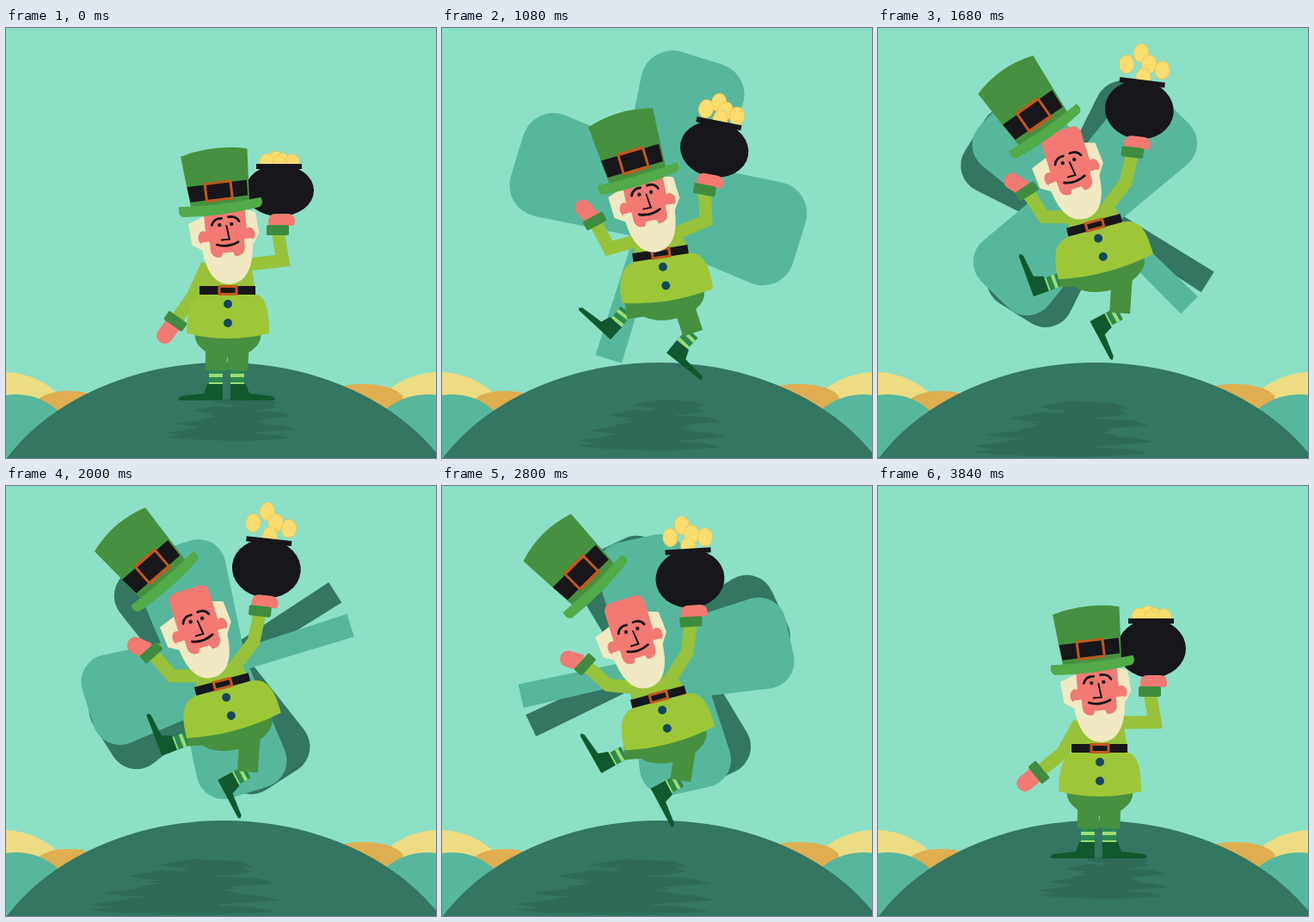
Recreate the animation shown at these times as an HTML page with a canvas. Size 500 by 500 pixels, loop 4 s.

```html
<!DOCTYPE html>
<html lang="en">
<head>
<meta charset="utf-8">
<title>Leprechaun jump</title>
<style>
  html, body { margin: 0; width: 100%; height: 100%; overflow: hidden; background: #8ce0c6; }
  canvas { display: block; width: 100vw; height: 100vh; }
</style>
</head>
<body>
<canvas id="stage" width="500" height="500"></canvas>
<script>
const ctx = document.getElementById('stage').getContext('2d');
const LOOP = 4000, RAD = Math.PI / 180;
const C = {
  sky: '#8ce0c6', hill: '#337662', teal: '#57b79c', shadow: '#2d6a57', sand: '#deae50', straw: '#ecdc84',
  gold: '#fbdc6e', crown: '#46913f', brim: '#52aa48', black: '#17161a', buckle: '#c0591c', skin: '#f27a72',
  hair: '#f0e9c2', lime: '#9dc638', sleeve: '#98c23a', cuff: '#3f8c40', shoe: '#10592f', button: '#15475f'
};

// torso: x, y, angle, belly half width, shoulder height; other parts: x, y, angle
const STAND = { torso: [258, 305, 0, 48, -30], pot: [318, 189, 0], hand: [197, 341], footL: [244, 414, 0], footR: [269, 414, 0] };
const CROUCH = { torso: [258, 310, 0, 49, -28], pot: [335, 208, 17], hand: [171, 285], footL: [213, 408, 3], footR: [297, 410, 5] };
const FLOAT = { torso: [252, 229, -15, 57, -14], pot: [304, 95, 7], hand: [182, 183], footL: [196, 298, 70], footR: [267, 339, 62] };

const clamp = v => Math.min(1, Math.max(0, v));
const mix = (a, b, k) => a + (b - a) * k;
const add = (part, ...by) => by.forEach((v, i) => part[i] += v);

function ramp(t, from, to) {
  const u = clamp((t - from) / (to - from));
  return u * u * (3 - 2 * u);
}

function poseAt(t) {
  const crouch = ramp(t, 240, 680) - ramp(t, 3540, 3840);
  const air = ramp(t, 800, 1300) - ramp(t, 3210, 3540);
  const loose = ramp(t, 800, 1300);
  const slip = air * Math.min(1.2, Math.max(0, (t - 1400) / 1800)) ** 3;
  const toss = air * Math.sin(Math.PI * clamp((t - 1400) / 2400)) ** .6;
  const p = { crouch, air, slip, toss };
  for (const part in STAND) {
    p[part] = STAND[part].map((v, i) => mix(mix(v, CROUCH[part][i], crouch), FLOAT[part][i], air));
  }
  add(p.torso, 0, 7 * slip, 0, -6 * slip);
  add(p.pot, -33 * slip, 0, -22 * slip);
  add(p.footL, 4 * slip, 15 * slip, -20 * slip);
  add(p.footR, -8 * slip, -4 * slip);
  const settle = loose * (1 - air) * (1 - crouch);
  add(p.hand, -16 * toss - 10 * settle, 12 * toss - 8 * settle);
  p.potHeight = 30 + 4 * loose;
  p.coinLift = clamp(air * (1 - .6 * slip * slip));

  const tilt = p.torso[2] - 5 * (1 - air) - 2 * air;
  const neck = toStage(p.torso, -2 - 8 * air, -68 + 16 * crouch * (1 - air) - 3 * air - 7 * slip);
  p.head = [...neck, tilt];
  p.hat = [...toStage(p.head, -4, -30 + 4 * air), tilt - 2 - 4 * air];
  add(p.hat, -34 * toss, -36 * toss, -22 * toss);
  return p;
}

function toStage([x, y, deg], px, py) {
  const c = Math.cos(deg * RAD), s = Math.sin(deg * RAD);
  return [x + px * c - py * s, y + px * s + py * c];
}

// Middle joint of a two-bone limb
function joint([ax, ay], [bx, by], bend, upper = 40, lower = 36) {
  const d = Math.min(Math.hypot(bx - ax, by - ay), upper + lower);
  const turn = Math.acos((upper ** 2 + d ** 2 - lower ** 2) / (2 * upper * d));
  const a = Math.atan2(by - ay, bx - ax) + bend * turn;
  return [ax + upper * Math.cos(a), ay + upper * Math.sin(a)];
}

function place(x, y, deg, draw) {
  ctx.save();
  ctx.translate(x, y);
  ctx.rotate(deg * RAD);
  draw();
  ctx.restore();
}

function fill(color, path) {
  ctx.beginPath();
  path();
  ctx.fillStyle = color;
  ctx.fill();
}

const poly = (color, ...pts) => fill(color, () => pts.forEach(p => ctx.lineTo(...p)));
const oval = (color, x, y, rx, ry) => fill(color, () => ctx.ellipse(x, y, rx, ry, 0, 0, 7));
const box = (color, x, y, w, h, r = 0) => fill(color, () => ctx.roundRect(x, y, w, h, r));

function line(color, width, pts, dash = []) {
  ctx.beginPath();
  pts.forEach(p => ctx.lineTo(...p));
  ctx.strokeStyle = color;
  ctx.lineWidth = width;
  ctx.setLineDash(dash);
  ctx.stroke();
  ctx.setLineDash([]);
}

function frame(x, y, w, h) {
  ctx.strokeStyle = C.buckle;
  ctx.lineWidth = 3;
  ctx.strokeRect(x, y, w, h);
}

function drawHills() {
  for (const x of [-5, 505]) oval(C.straw, x, 470, 85, 70);
  oval(C.sand, 73, 440, 40, 18);
  oval(C.sand, 415, 432, 47, 18);
  oval(C.teal, 12, 506, 75, 80);
  oval(C.teal, 490, 506, 78, 80);
  oval(C.hill, 253, 611, 291, 222);
}

// Overshooting growth from 0 to 1
function back(u, amount) {
  const w = 1 - clamp(u);
  return 1 + amount * w ** 2 - (amount + 1) * w ** 3;
}

const cloverAngle = t => -176 - 195 * Math.sin((t - 2308) * .00117);

function drawClover(t) {
  for (const [color, lag] of [[C.hill, 70], [C.teal, 0]]) {
    const scale = t < 2400 ? back((t - 920 - lag) / 640, 4) : back((3560 - t) / 420, 1.7);
    if (scale <= 0) continue;
    place(248, 210, cloverAngle(t + lag), () => {
      ctx.scale(scale, scale);
      ctx.translate(0, -10);
      poly(color, [-12, 0], [12, 0], [14, 170], [-14, 170]);
      for (const side of [-90, 0, 90]) place(0, 0, side, () => fill(color, () => {
        ctx.moveTo(-42, 0);
        ctx.arcTo(-57, -150, 0, -150, 32);
        ctx.arcTo(57, -150, 42, 0, 32);
        ctx.lineTo(42, 0);
      }));
    });
  }
}

// Ragged stack of pointed streaks
function drawShadow({ air, toss }) {
  const left = mix(175, 125, air) - 58 * toss, right = 357 - 9 * air;
  const top = 432 + 5 * air, bottom = mix(478, 496, air), rows = 9;
  for (let i = 0; i < rows; i++) {
    const v = (i + .5) / rows, wobble = Math.sin(i * 2.4);
    const x = mix(left, right, .58 - .16 * v + .1 * wobble), y = mix(top, bottom, v);
    const half = (right - left) * (.14 + .24 * v + .05 * Math.cos(i * 4));
    const thick = (bottom - top) / rows;
    poly(C.shadow, [x - half, y], [x - half * .3, y - thick], [x + half * .7, y - thick * .6],
      [x + half, y + thick * .3], [x + half * .2, y + thick], [x - half * .7, y + thick * .5]);
  }
}

function drawLeg(hip, foot, width, flip, crouch) {
  const ankle = toStage(foot, -4 * crouch * flip, -16 - 5 * crouch);
  const top = foot.slice(0, 2);
  line('#2b8a4e', 16, [ankle, top]);
  line('#9bdc74', 16, [ankle, top], [0, 4, 4, 2]);
  line(C.crown, width, [hip, ankle]);
  place(...foot, () => {
    ctx.scale(flip, 1);
    poly(C.shoe, [8, 0], [-10, 0], [-14, 11], [-41, 14], [-44, 17], [-42, 19], [8, 19]);
  });
}

function drawLegs({ torso, footL, footR, air, crouch }) {
  const flex = crouch * (1 - air);
  drawLeg(toStage(torso, -13, 60), footL, 25 - 8 * air, 1, flex);
  drawLeg(toStage(torso, 13 + 5 * air, 58), footR, 24, -1, flex);
  place(...torso.slice(0, 3), () => oval(C.crown, 0, 52, torso[3] * .8, 26));
}

function drawArms({ torso, pot, hand, air, potHeight }) {
  const top = torso[4], reach = 9 - top / 2;
  const right = toStage(torso, reach, top), left = toStage(torso, -reach, top);
  const wrist = toStage(pot, -2, potHeight + 16), elbow = joint(left, hand, -1);
  line(C.sleeve, 15, [right, joint(right, wrist, 1), wrist]);
  line(C.sleeve, 15, [left, elbow, hand]);
  place(...hand, Math.atan2(hand[1] - elbow[1], hand[0] - elbow[0]) / RAD - 90, () => {
    place(0, 0, -25 * air, () => box(C.skin, -10, 4, 19, 26, [0, 0, 9, 9]));
    box(C.cuff, -13, -6, 26, 12, 2);
  });
}

function drawTorso({ torso: [x, y, deg, w, top] }) {
  place(x, y, deg, () => {
    poly(C.sleeve, [-33, 6], [-26, top - 7], [26, top - 7], [33, 6]);
    fill(C.lime, () => {
      ctx.moveTo(-w, 50);
      ctx.bezierCurveTo(-w, 20, 8 - w, 5, -29, 5);
      ctx.lineTo(31, 5);
      ctx.bezierCurveTo(w - 5, 5, w, 22, w, 50);
      ctx.quadraticCurveTo(0, 62, -w, 50);
    });
    box(C.black, -33, -5, 65, 10);
    frame(-10, -4.5, 20, 9);
    for (const y of [16, 38]) oval(C.button, 0, y, 5, 5);
  });
}

function drawPot({ pot, potHeight: ry, coinLift }) {
  place(...pot, () => {
    for (const [x, y] of [[-6, -66], [5, -54], [-21, -51], [21, -49], [0, -38]]) {
      const cx = x * mix(.7, 1, coinLift), cy = mix(-ry - 2 + (y + 50) * .2, y, coinLift);
      oval('#edc458', cx, cy, 9, 11);
      oval(C.gold, cx, cy, 8.3, 10.3);
    }
    oval(C.black, 0, 0, 40, ry);
    box(C.black, -27, -ry - 1, 53, 6);
    box(C.skin, -13, ry - 3, 31, 14, [8, 8, 4, 2]);
    box(C.cuff, -15, ry + 10, 26, 12, 2);
  });
}

function drawHead({ head }) {
  place(...head, () => {
    poly(C.hair, [-24, -20], [-43, -13], [-41, 12], [-28, 20], [28, 20], [38, 5], [36, -20], [24, -24]);
    for (const x of [-27, 27]) oval(C.skin, x, 5, 6, 8);
    fill(C.hair, () => {
      ctx.moveTo(-30, 10);
      ctx.bezierCurveTo(-29, 44, -18, 61, 0, 61);
      ctx.bezierCurveTo(18, 61, 29, 44, 30, 10);
    });
    box(C.skin, -24, -46, 48, 60, [9, 9, 12, 12]);
    box(C.skin, -20, 0, 40, 29, [0, 0, 9, 9]);
    poly(C.hair, [-9, 31], [-6, 24], [6, 24], [9, 31]);
    ctx.lineCap = 'round';
    line(C.black, 2, [[1, -7], [3, 9], [-6, 9]]);
    ctx.lineWidth = 2.8;
    ctx.beginPath();
    ctx.moveTo(-16, -9);
    ctx.quadraticCurveTo(-13, -17, -4, -16);
    ctx.moveTo(4, -17);
    ctx.quadraticCurveTo(13, -18, 16, -11);
    ctx.moveTo(-12, 14);
    ctx.quadraticCurveTo(0, 19, 13, 13);
    ctx.stroke();
    ctx.lineCap = 'butt';
    for (const x of [-7, 7]) oval(C.black, x, -8.5, 2.2, 2.2);
  });
}

function drawHat({ hat, air }) {
  place(...hat, () => {
    ctx.save();
    ctx.scale(1, 1 + .27 * air);
    fill(C.crown, () => {
      ctx.moveTo(-34, 0);
      ctx.lineTo(-39, -63);
      ctx.quadraticCurveTo(0, -73, 39, -63);
      ctx.lineTo(34, 0);
    });
    poly(C.black, [-34, -9], [-36, -27], [34, -27], [33, -9]);
    frame(-15, -28, 30, 20);
    ctx.restore();
    fill(C.brim, () => {
      ctx.moveTo(-48, -5);
      ctx.quadraticCurveTo(0, -1, 48, -5);
      ctx.quadraticCurveTo(51, 3, 45, 6);
      ctx.quadraticCurveTo(0, 12, -45, 7);
      ctx.quadraticCurveTo(-51, 4, -48, -5);
    });
  });
}

function render(t) {
  const pose = poseAt(t);
  box(C.sky, 0, 0, 500, 500);
  drawClover(t);
  drawHills();
  drawShadow(pose);
  place(0, 27 * pose.slip, 0, () => {
    for (const draw of [drawLegs, drawArms, drawTorso, drawPot, drawHead, drawHat]) draw(pose);
  });
}

function tick() {
  render(performance.now() % LOOP);
  requestAnimationFrame(tick);
}
tick();
</script>
</body>
</html>
```
